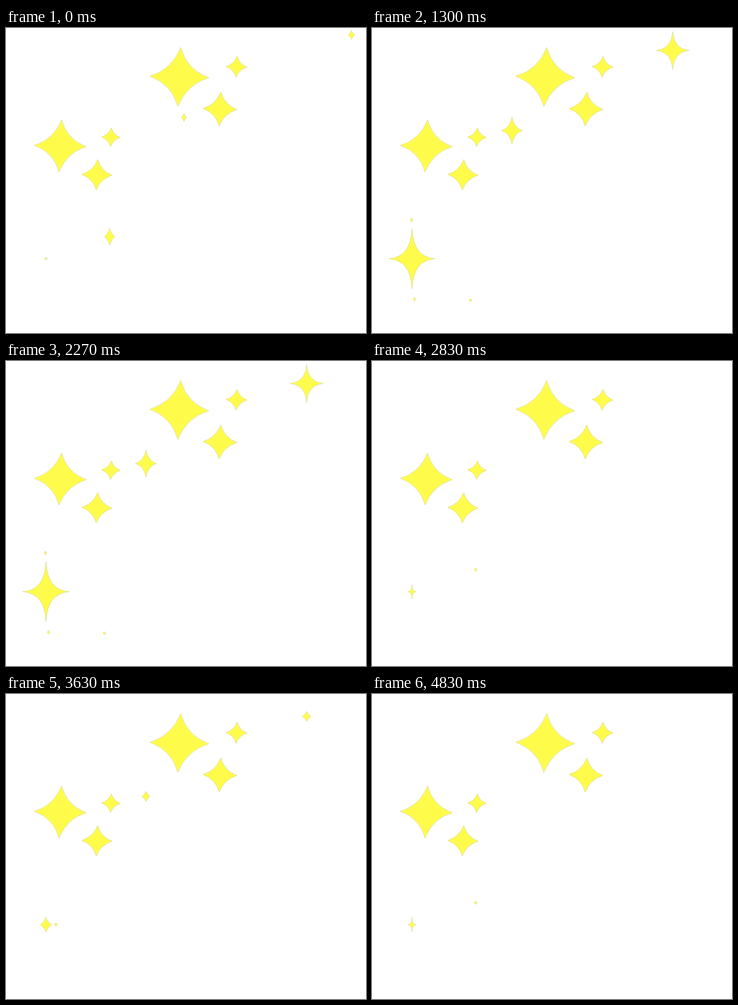
Write an HTML page with a canvas that moves like this. It is 360x305 px and loops after 5000 ms.

```html
<!DOCTYPE html>
<html lang="en">
<head>
<meta charset="utf-8">
<title>Twinkling stars</title>
<style>
  html, body { margin: 0; width: 100%; height: 100%; overflow: hidden; background: #fff; }
  canvas { display: block; }
</style>
</head>
<body>
<canvas id="stage" width="360" height="305"></canvas>
<script>
const ctx = document.getElementById('stage').getContext('2d');
const LOOP = 5000, TICK = 100 / 3, POSES = 12;

// Steady stars: x, y, radius
const steady = [
  [173.3, 49, 29.5], [54.3, 118, 26], [105, 109.2, 9.4],
  [91, 146.8, 15.2], [214, 81, 17], [230.6, 38.8, 10.6]
];

// Twinkles: x, y, first, fullest and last pose, half width, half height, pinch
const twinkles = [
  [40, 230.7, 0, 6, 8.4, 35, 45],
  [40, 230.7, 8, 9, 12.4, 6, 10, 0],
  [50, 230.5, 7, 9, 10, 3, 2.5],
  [300.7, 22.5, 0.3, 5, 8.8, 21, 24],
  [140, 102.5, 1, 5, 9.2, 14, 18],
  [345.5, 7, -1.5, 0.5, 2.5, 4.4, 5.8],
  [178, 89.5, -2, 0.5, 2.5, 3, 5],
  [103.7, 208.7, -2.5, 0.5, 3, 6.2, 10.2],
  [39.5, 192, 3, 5.5, 7.5, 3, 5],
  [42.5, 271.2, 3, 5.5, 7.5, 3, 5],
  [98.5, 272.2, 3.8, 7, 7.9, 12, 16.5]
];

// Four tips joined by curves that bend in towards the middle
function star(x, y, w, h, pinch, lean = 0) {
  ctx.beginPath();
  ctx.moveTo(x + lean, y - h);
  for (let i = 1; i <= 4; i++) {
    const c = Math.round(Math.cos(i * Math.PI / 2)), s = Math.round(Math.sin(i * Math.PI / 2));
    ctx.quadraticCurveTo(
      x + (s + c) * (i % 2 ? s * s : c * c) * (i % 2 ? 1 : -1) * w * pinch,
      y + (i < 2 || i > 3 ? -1 : 1) * h * pinch,
      x + s * w + c * lean, y - c * h + s * lean / 2);
  }
  ctx.closePath();
  ctx.fill();
  ctx.stroke();
}

function twinkle(pose, [x, y, first, peak, last, w, h, pinch]) {
  const at = pose > first && pose < last ? pose : pose > first + POSES ? pose - POSES : pose + POSES;
  if (at <= first || at >= last) return;
  const size = at < peak ? (at - first) / (peak - first) : (last - at) / (last - peak);
  const halfW = Math.max(1.5, w * size), halfH = Math.max(1.5, h * size);
  star(x, y, halfW, halfH, pinch ?? Math.max(0.05, 0.4 - halfW * 0.02));
}

// Four rounds, a short hold, then a slightly quicker fifth round
function poseAt(ms) {
  const tick = Math.floor(ms / TICK + 0.01);
  const step = tick < 119
    ? Math.min(47, tick * 7 / 17 + 0.15)
    : Math.min(11, (tick - 119) / 2.4 + 0.2);
  return Math.floor(step) % POSES;
}

function draw(now) {
  const pose = poseAt(now % LOOP);
  ctx.clearRect(0, 0, 360, 305);
  ctx.fillStyle = '#fffb4b';
  ctx.strokeStyle = 'rgba(205, 205, 140, .55)';
  ctx.lineWidth = 0.7;
  ctx.lineJoin = 'round';
  for (const [x, y, r] of steady) star(x, y, r, r, 0.25, r / 20);
  for (const item of twinkles) twinkle(pose, item);
}

let start;
function loop(now) {
  start ??= now;
  draw(now - start);
  requestAnimationFrame(loop);
}
requestAnimationFrame(loop);
</script>
</body>
</html>
```
